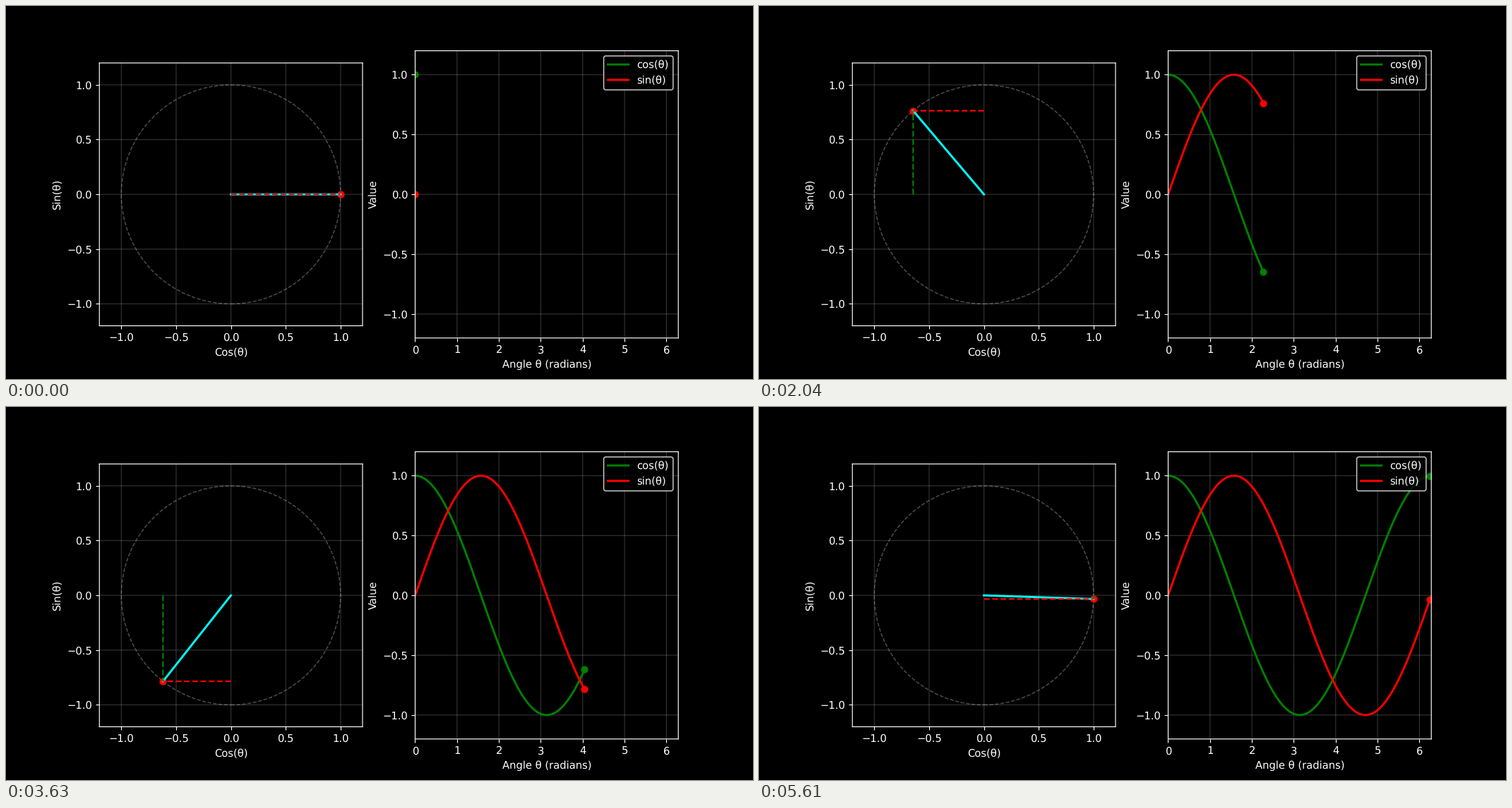
A matplotlib script for the animation above (5.64 s loop, 1058x529 px).

```python
import numpy as np
import matplotlib.pyplot as plt
from matplotlib.animation import FuncAnimation

FRAMES = 188
STEP_MS = 30

plt.style.use("dark_background")
plt.rcParams.update({
    "font.family": "DejaVu Sans",
    "text.hinting": "no_hinting",
    "path.snap": False,
})
theta = np.linspace(0, 2 * np.pi, FRAMES, endpoint=False)
cos, sin = np.cos(theta), np.sin(theta)

fig, (ax_circle, ax_wave) = plt.subplots(1, 2, figsize=(10, 5), dpi=105.8)

# Unit circle
ax_circle.set_xlim(-1.2, 1.2)
ax_circle.set_ylim(-1.2, 1.2)
ax_circle.set_aspect("equal")
ax_circle.set_xlabel("Cos(θ)")
ax_circle.set_ylabel("Sin(θ)")
ax_circle.grid(alpha=0.2)
ax_circle.add_patch(plt.Circle((0, 0), 1, fill=False, color="gray",
                               ls="--", alpha=0.6))
tip, = ax_circle.plot([], [], "ro")
radius, = ax_circle.plot([], [], color="cyan", lw=2)
drop, = ax_circle.plot([], [], "--", color="green", lw=1.5)
reach, = ax_circle.plot([], [], "--", color="red", lw=1.5)

# Waves
ax_wave.set_xlim(0, 2 * np.pi)
ax_wave.set_ylim(-1.2, 1.2)
ax_wave.set_xlabel("Angle θ (radians)")
ax_wave.set_ylabel("Value")
ax_wave.grid(alpha=0.2)
cos_line, = ax_wave.plot([], [], color="green", lw=2, label="cos(θ)")
sin_line, = ax_wave.plot([], [], color="red", lw=2, label="sin(θ)")
cos_dot, = ax_wave.plot([], [], "o", color="green")
sin_dot, = ax_wave.plot([], [], "o", color="red")
ax_wave.legend(loc="upper right", edgecolor="white")


def update(i):
    t, x, y = theta[i], cos[i], sin[i]
    radius.set_data([0, x], [0, y])
    tip.set_data([x], [y])
    drop.set_data([x, x], [0, y])
    reach.set_data([0, x], [y, y])
    cos_line.set_data(theta[:i + 1], cos[:i + 1])
    sin_line.set_data(theta[:i + 1], sin[:i + 1])
    cos_dot.set_data([t], [x])
    sin_dot.set_data([t], [y])
    return radius, tip, drop, reach, cos_line, sin_line, cos_dot, sin_dot


anim = FuncAnimation(fig, update, frames=FRAMES, interval=STEP_MS,
                     repeat=True, repeat_delay=0)
plt.show()
```
